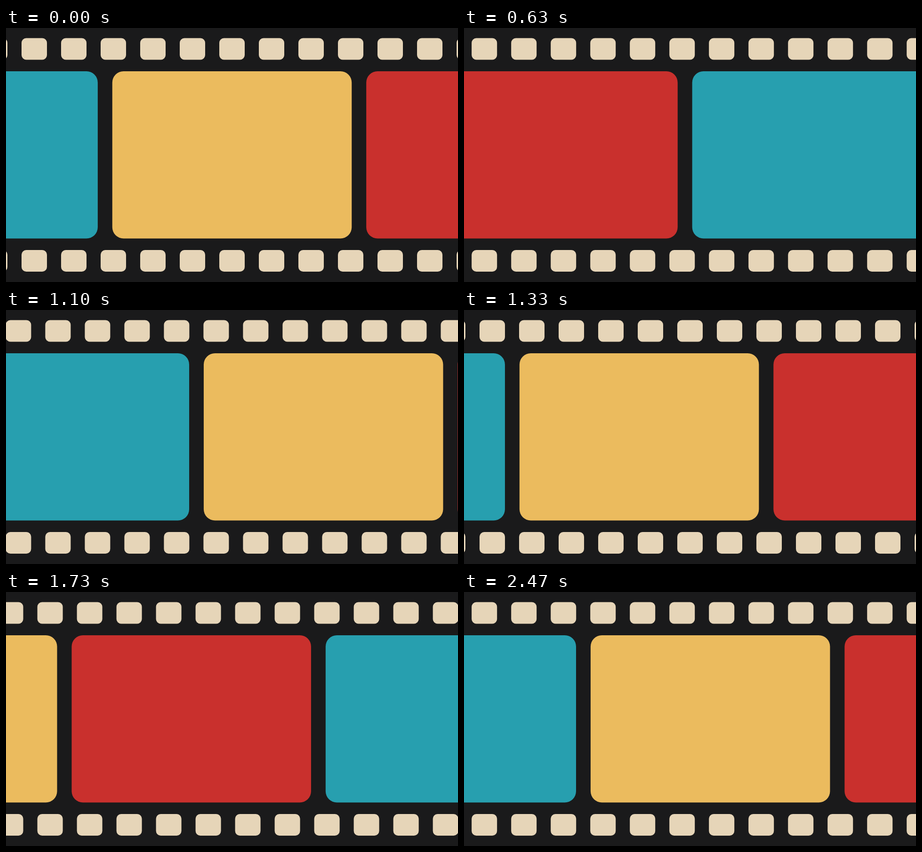
Write an HTML page with a canvas that moves like this. It is 960x540 px and loops after 2510 ms.

```html
<!DOCTYPE html>
<html lang="en">
<head>
<meta charset="utf-8">
<title>Film strip</title>
<style>
html, body { margin: 0; width: 100%; height: 100%; overflow: hidden; background: #1a1a1b; }
canvas { display: block; }
</style>
</head>
<body>
<canvas id="stage" width="960" height="540"></canvas>
<script>
const ctx = document.getElementById('stage').getContext('2d');
const LOOP = 2510, STEPS = 75;
const PANEL_PITCH = 539.4, HOLE_PITCH = 84;
const COLORS = ['#ebbb5e', '#c9302d', '#279faf'];
const STRIP = PANEL_PITCH * COLORS.length;

function box(x, y, w, h, r, color) {
  ctx.fillStyle = color;
  ctx.beginPath();
  ctx.roundRect(x, y, w, h, r);
  ctx.fill();
}

function draw(time) {
  // The strip advances in 1/30 s steps, aligned to 10 ms ticks.
  const tick = Math.floor(time % LOOP / 10);
  const step = Math.min(STEPS - 1, Math.floor((3 * tick + 1) / 10));
  ctx.fillStyle = '#1a1a1b';
  ctx.fillRect(0, 0, 960, 540);

  // Two full passes of the three panels per loop.
  const shift = step * 2 / STEPS * STRIP % STRIP;
  for (let i = -1; i < 6; i++) {
    box(225.75 - shift + i * PANEL_PITCH, 92, 508.5, 355.5, 24, COLORS[(i + 3) % 3]);
  }

  // Each step moves the holes left by four fifths of their spacing.
  const slide = step * 0.8 % 1 * HOLE_PITCH;
  for (let x = 33 - HOLE_PITCH - slide; x < 960; x += HOLE_PITCH) {
    for (const y of [21.5, 472]) box(x, y, 54, 46, 10, '#e6d5b8');
  }
}

function tickFrame() {
  draw(performance.now());
  requestAnimationFrame(tickFrame);
}
tickFrame();
</script>
</body>
</html>
```
